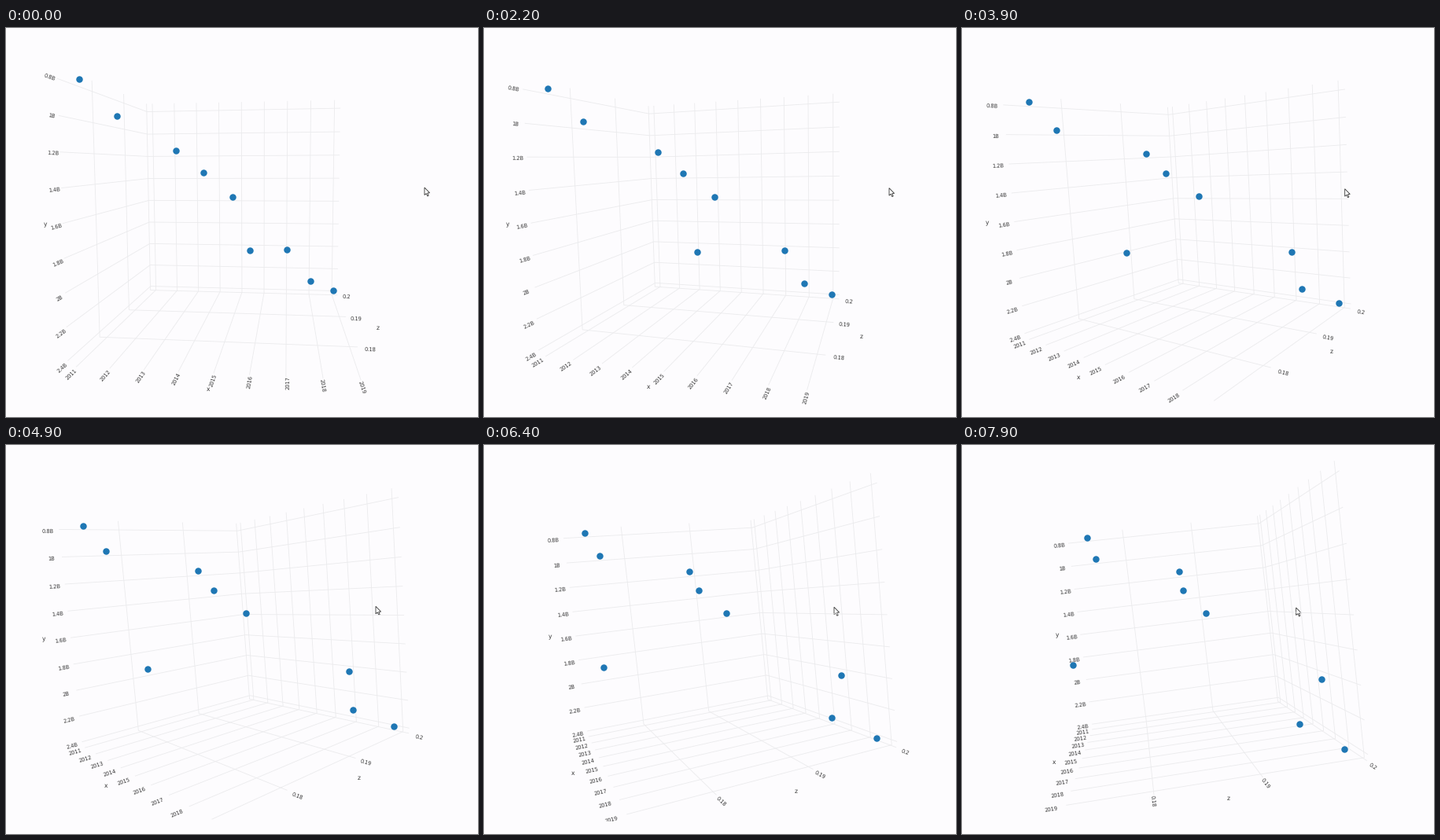
Animation, 600 px wide and 495 px high, one loop 8 s. Source, as a matplotlib script:

```python
import numpy as np
import matplotlib.pyplot as plt
from matplotlib.animation import FuncAnimation
from matplotlib.collections import LineCollection

plt.rcParams['text.hinting'] = 'none'

W, H, FLOOR = 600, 495, 479      # the plot is cut off at FLOOR
FRAMES, STEP = 80, 0.1
VIEW = 501                       # a drag of this many pixels is one full turn
CENTER = np.array([285.5, 228.4])
SCALE, NEAR = 302, 0.495         # pixels per unit at the cube's centre, 1 / camera distance
TIP = np.array([532, 203])       # pointer at rest
TICK_GAP, NAME_GAP = 0.046, 0.115

# Axis ranges and samples (year, billions, ratio).
YEARS = np.arange(2011, 2020)
LEVELS = np.arange(0.8, 2.5, 0.2)
RATIOS = [0.18, 0.19, 0.2]
RANGES = [(2010.75, 2019.25), (2.4346, 0.7306), (0.20016, 0.17216)]
BILLIONS = [0.777, 0.986, 1.174, 1.335, 1.517, 1.747, 2.026, 2.242, 2.368]
SHARE = [0.1749, 0.1760, 0.1867, 0.1866, 0.1886, 0.1730, 0.1993, 0.1953, 0.1983]


def unit(value, axis):
    """Data value to the cube's -0.5 .. 0.5."""
    lo, hi = RANGES[axis]
    return (value - lo) / (hi - lo) - 0.5


def turn(m, a, b, angle):
    """Rotate row a of the camera matrix towards row b."""
    m = m.copy()
    c, s = np.cos(angle), np.sin(angle)
    m[a], m[b] = c * m[a] + s * m[b], c * m[b] - s * m[a]
    return m


def project(points, cam):
    q = np.asarray(points) @ cam.T
    m = SCALE / (1 - NEAR * q[..., 2:])
    return CENTER + m * q[..., :2] * [1, -1]


# The drag picks up speed, runs evenly and slows down near the end.
clock = np.arange(FRAMES) * STEP
speed = np.interp(clock, [0.6, 1.76, 7.1, 7.9], [0, 16.67, 16.67, 5])
travel = np.append(0, np.cumsum((speed[1:] + speed[:-1]) / 2 * STEP))
pointer = TIP + np.outer(travel, [-1, 4 / 107])

# Camera rows: right, up, back.
RIGHT, UP, BACK = range(3)
cam = turn(np.eye(3), BACK, RIGHT, 0.117)
cam = turn(cam, BACK, UP, 0.091)
cam = turn(cam, UP, RIGHT, 0.005)
cams = [cam]
for dx, dy in np.diff(pointer, axis=0) * 2 * np.pi / VIEW:
    cam = turn(cam, BACK, RIGHT, -dx)
    cams.append(turn(cam, BACK, UP, dy))
    cam = cams[-1]

# Grid on the back wall, left wall and floor; ticks sit on the front edges.
LO, HI = -0.5, 0.5
grid, ticks = [], []


def add_tick(text, wall, edge):
    grid.extend([wall, edge])
    ticks.append((text, edge))


for year in YEARS:
    x = unit(year, 0)
    add_tick(f'{year}', [(x, HI, LO), (x, LO, LO)], [(x, LO, LO), (x, LO, HI)])
for level in LEVELS:
    y = unit(level, 1)
    add_tick(f'{level:.2g}B', [(HI, y, LO), (LO, y, LO)], [(LO, y, LO), (LO, y, HI)])
for ratio in RATIOS:
    z = unit(ratio, 2)
    add_tick(f'{ratio:g}', [(LO, HI, z), (LO, LO, z)], [(LO, LO, z), (HI, LO, z)])
names = [('x', [(0, LO, LO), (0, LO, HI)]),
         ('y', [(LO, 0, LO), (LO, 0, HI)]),
         ('z', [(LO, LO, 0), (HI, LO, 0)])]
samples = np.column_stack([unit(YEARS, 0), unit(np.array(BILLIONS), 1), unit(np.array(SHARE), 2)])

fig = plt.figure(figsize=(W / 100, H / 100), dpi=100, facecolor='#fdfcfe')
ax = fig.add_axes([0, 1 - FLOOR / H, 1, FLOOR / H])
ax.set(xlim=(0, W), ylim=(FLOOR, 0))
ax.axis('off')

lines = ax.add_collection(LineCollection([], colors='#ebebed', linewidths=0.6))


def label(text, px):
    return ax.text(0, 0, text, size=px * 0.72, color='#383838', family='DejaVu Sans',
                   ha='center', va='center', rotation_mode='anchor', clip_on=True)


tick_texts = [label(text, 6.6) for text, _ in ticks]
name_texts = [label(text, 7.6) for text, _ in names]
dots, = ax.plot([], [], 'o', ms=6.1, mew=0, color='#1f77b4')
ARROW = np.array([(0, 0), (0, 9.5), (2.2, 7.6), (3.8, 11), (5.2, 10.3), (3.7, 7), (6.6, 6.8)])
arrow = ax.add_patch(plt.Polygon(ARROW, fc='white', ec='#333', lw=0.6))


def beyond(edge, gap, cam):
    """Screen spot past the edge's end, and the direction of the edge there."""
    a, b = np.array(edge)
    end, spot = project([b, b + gap * (b - a)], cam)
    return spot, spot - end


def draw(i):
    cam = cams[i]
    lines.set_segments(project(grid, cam))
    for text, (_, edge) in zip(tick_texts, ticks):
        spot, (dx, dy) = beyond(edge, TICK_GAP, cam)
        angle = (np.arctan2(-dy, dx) + np.pi / 2) % np.pi - np.pi / 2
        text.set_position(spot + 2.3 * np.array([np.sin(angle), np.cos(angle)]))
        text.set_rotation(np.degrees(angle))
    for text, (_, edge) in zip(name_texts, names):
        text.set_position(beyond(edge, NAME_GAP, cam)[0])
    dots.set_data(*project(samples, cam).T)
    arrow.set_xy(ARROW + pointer[i])


anim = FuncAnimation(fig, draw, frames=FRAMES, interval=STEP * 1000, repeat=True, repeat_delay=0)
plt.show()
```
